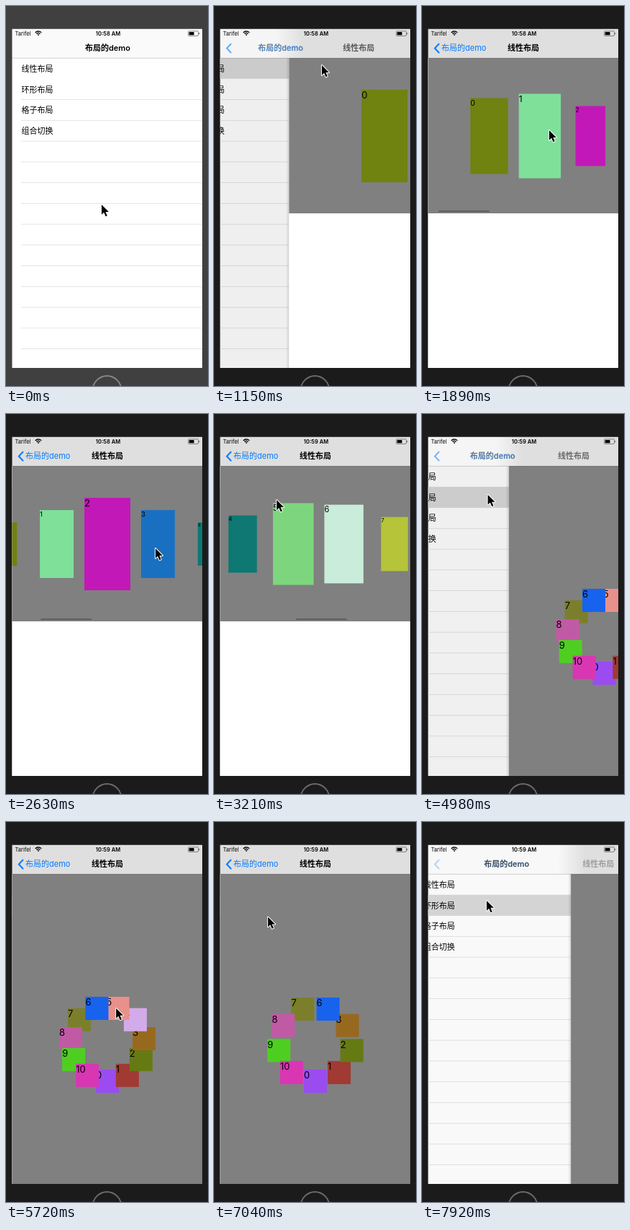
An HTML page with a canvas that plays this animation: 281x526 px, repeating every 8 s.

```html
<!DOCTYPE html>
<html lang="zh">
<head>
<meta charset="utf-8">
<style>
  html, body { margin: 0; width: 100%; height: 100%; overflow: hidden; background: #1b1b1b; }
  canvas { display: block; width: 281px; height: 526px; }
</style>
</head>
<body>
<canvas></canvas>
<script>
const LOOP = 8000, STEP = 147.2;
const LEFT = 8, RIGHT = 273, TOP = 32, BAR = 72, BOTTOM = 501, WIDTH = RIGHT - LEFT, MID = 141;
const FONT = 'Inter, "Noto Sans CJK SC", "Noto Sans CJK", sans-serif';
const ROWS = ['线性布局', '环形布局', '格子布局', '组合切换'];
const HOME_TITLE = '布局的demo', PAGE_TITLE = '线性布局';
const CARD_COLORS = ['#708210', '#7ee099', '#c218b8', '#1a70c0', '#0e7872', '#7dd67d',
  '#c9edda', '#b5c438', '#a05ac8', '#d07848', '#5088d0'];
const RING_COLORS = ['#9a4cf0', '#a03a33', '#667a14', '#97691f', '#d3abea', '#e8918a',
  '#1763ee', '#7b7f2b', '#c05aa5', '#4fce22', '#d936b4'];
const RING_ORDER = [0, 1, 2, 3, 4, 5, 7, 6, 8, 9, 10];

// Navigation: start time, opening or closing, which page
const NAVIGATION = [
  { at: 1030, open: true, page: 0 }, { at: 3917, open: false, page: 0 },
  { at: 4870, open: true, page: 1 }, { at: 7772, open: false, page: 1 },
];
const SELECTIONS = [{ row: 0, from: 900, until: 4217 }, { row: 1, from: 4740, until: 8100 }];
const REMOVALS = [{ at: 6120, id: 5 }, { at: 6650, id: 4 }];

// Keyframes: time followed by values
const CURSOR = [
  [0, 133, 275], [140, 134, 270], [720, 150, 90], [860, 150, 82], [1450, 150, 82],
  [1740, 228, 172], [2040, 122, 172], [2330, 205, 186], [2630, 208, 186], [2770, 205, 180],
  [3210, 87, 119], [3500, 60, 88], [3780, 24, 58], [3940, 24, 58], [4090, 43, 58],
  [4380, 90, 111], [5130, 92, 112], [5720, 154, 260], [6020, 157, 262], [6800, 157, 262],
  [7190, 22, 47], [7330, 23, 57], [7780, 23, 57], [7920, 90, 109],
];
const SCROLL = [[1740, 0], [2040, 1.4], [2200, 1.85], [2400, 2], [2630, 2], [2770, 2.5],
  [3210, 5.44], [3350, 6.2], [3500, 6.65], [3640, 6.8]];

const canvas = document.querySelector('canvas');
const ctx = canvas.getContext('2d');
const ratio = window.devicePixelRatio || 1;
canvas.width = 281 * ratio;
canvas.height = 526 * ratio;

const clamp = x => Math.max(0, Math.min(1, x));
const mix = (a, b, u) => a + (b - a) * u;
const smooth = u => u * u * (3 - 2 * u);
const spring = ms => {
  const x = Math.max(0, ms) * 0.01826;
  return 1 - (1 + x) * Math.exp(-x);
};

function track(frames, t) {
  const i = frames.findIndex(f => f[0] > t);
  if (i < 0) return frames.at(-1).slice(1);
  if (i === 0) return frames[0].slice(1);
  const a = frames[i - 1], b = frames[i], u = (t - a[0]) / (b[0] - a[0]);
  return a.slice(1).map((v, k) => mix(v, b[k + 1], u));
}

function rect(x, y, w, h, color) {
  ctx.fillStyle = color;
  ctx.fillRect(x, y, w, h);
}

function text(str, x, y, size, { weight = 400, color = '#000', alpha = 1, align = 'left' } = {}) {
  ctx.save();
  ctx.globalAlpha *= alpha;
  ctx.font = `${weight} ${size}px ${FONT}`;
  ctx.textAlign = align;
  ctx.fillStyle = color;
  ctx.fillText(str, x, y);
  ctx.restore();
}

function clipped(x, y, w, h, draw) {
  ctx.save();
  ctx.beginPath();
  ctx.rect(x, y, w, h);
  ctx.clip();
  draw();
  ctx.restore();
}

function navState(t) {
  const move = NAVIGATION.findLast(n => n.at <= t);
  if (!move) return { page: 0, shown: 0, bar: 0 };
  const u = spring(t - move.at), lag = u ** 1.18;
  return { page: move.page, shown: move.open ? u : 1 - u, bar: move.open ? lag : 1 - lag };
}

function drawList(t, shown) {
  const rowHeight = 28.75;
  rect(LEFT, BAR, WIDTH, BOTTOM - BAR, '#fff');
  ctx.save();
  ctx.translate(-0.3 * WIDTH * shown, 0);
  for (let i = 2; i < 15; i++) rect(21, BAR + rowHeight * i - 0.3, 400, 0.8, '#dedee1');
  for (const s of SELECTIONS) {
    if (t < s.from) continue;
    ctx.globalAlpha = 1 - clamp((t - s.until) / 300);
    rect(LEFT, BAR + rowHeight * s.row, 400, rowHeight, '#d9d9d9');
    ctx.globalAlpha = 1;
  }
  ROWS.forEach((name, i) => text(name, 21.5, 90.8 + rowHeight * i, 11));
  ctx.restore();
  rect(LEFT, BAR, WIDTH, BOTTOM - BAR, `rgba(0,0,0,${0.1 * shown})`);
}

function drawTile(x, y, w, h, color, label, scale) {
  rect(x - w / 2 * scale, y - h / 2 * scale, w * scale, h * scale, color);
  text(label, x - w / 2 * scale, y - h / 2 * scale + 12.3 * scale, 13 * scale);
}

function drawCards(t) {
  const [scroll] = track(SCROLL, t);
  rect(LEFT, BAR, WIDTH, 215, '#808080');
  CARD_COLORS.forEach((color, i) => {
    const offset = 70.4 * (i - scroll), scale = 1 - Math.abs(offset) / WIDTH;
    if (scale > 0.35) drawTile(MID + offset, 180, 64, 128, color, i, scale);
  });
  if (t > 1740 && t < 3800) {
    ctx.fillStyle = '#5a5a5a';
    ctx.beginPath();
    ctx.roundRect(10 + 19.1 * scroll, 283.3, 71, 1.8, 0.9);
    ctx.fill();
  }
}

function drawRing(t) {
  rect(LEFT, BAR, WIDTH, BOTTOM - BAR, '#808080');
  for (const id of RING_ORDER) {
    let slot = id, count = RING_COLORS.length, alpha = 1;
    let angle = slot / count;
    for (const r of REMOVALS) {
      const u = smooth(clamp((t - r.at) / 300));
      count--;
      if (id === r.id) { alpha = 1 - u; break; }
      if (id > r.id) slot--;
      angle = mix(angle, slot / count, u);
    }
    ctx.globalAlpha = alpha;
    drawTile(MID + 51.5 * Math.sin(angle * 2 * Math.PI), 307.4 + 51.5 * Math.cos(angle * 2 * Math.PI),
      32, 32, RING_COLORS[id], id, 1);
    ctx.globalAlpha = 1;
  }
}

function drawPage(t, { page, shown }) {
  const shift = WIDTH * (1 - shown), edge = LEFT + shift;
  const shadow = ctx.createLinearGradient(edge - 4, 0, edge, 0);
  shadow.addColorStop(0, 'rgba(0,0,0,0)');
  shadow.addColorStop(1, `rgba(0,0,0,${0.13 * Math.min(1, shown * 4)})`);
  rect(edge - 4, BAR, 4, BOTTOM - BAR, shadow);
  clipped(edge, BAR, WIDTH, BOTTOM - BAR, () => {
    ctx.translate(shift, 0);
    rect(LEFT, BAR, WIDTH, BOTTOM - BAR, '#fff');
    (page === 0 ? drawCards : drawRing)(t);
  });
}

function drawBar({ shown, bar }) {
  const edge = LEFT + WIDTH * (1 - shown), light = Math.round(250 - 8 * shown);
  const listTone = `rgb(${light},${light},${light})`, pageTone = '#dfdfdf';
  let fill = shown > 0.5 ? pageTone : listTone;
  if (shown > 0.01 && shown < 0.99) {
    fill = ctx.createLinearGradient(edge - 18, 0, edge + 20, 0);
    fill.addColorStop(0, listTone);
    fill.addColorStop(1, pageTone);
  }
  rect(LEFT, TOP - 0.5, WIDTH, BAR - TOP + 0.5, fill);
  rect(LEFT, BAR - 0.2, WIDTH, 0.7, 'rgba(0,0,0,.25)');

  const x = 110 - 83 * bar;
  text(HOME_TITLE, x, 62.2, 11, { weight: 600, alpha: 1 - bar });
  text(HOME_TITLE, x, 62.2, 11, { color: '#007aff', alpha: bar });
  text(PAGE_TITLE, 119 + 146 * (1 - bar), 62.2, 11, { weight: 600, alpha: bar });

  ctx.save();
  ctx.globalAlpha = bar;
  ctx.strokeStyle = '#007aff';
  ctx.lineWidth = 2;
  ctx.beginPath();
  ctx.moveTo(24, 52);
  ctx.lineTo(17.8, 58.5);
  ctx.lineTo(24, 65);
  ctx.stroke();
  ctx.restore();
}

function drawStatus(t) {
  text('Tarifel', 12.5, 41, 7.5);
  text(t < 2900 ? '10:58 AM' : '10:59 AM', 142, 41, 7.6, { weight: 600, align: 'center' });
  ctx.strokeStyle = ctx.fillStyle = '#000';
  ctx.lineWidth = 1.3;
  for (const r of [3.6, 6]) {
    ctx.beginPath();
    ctx.arc(45, 41, r, -Math.PI * 0.76, -Math.PI * 0.24);
    ctx.stroke();
  }
  ctx.beginPath();
  ctx.moveTo(45, 41);
  ctx.arc(45, 41, 2, -Math.PI * 0.76, -Math.PI * 0.24);
  ctx.fill();
  ctx.lineWidth = 0.7;
  ctx.strokeStyle = '#555';
  ctx.beginPath();
  ctx.roundRect(253.5, 34.8, 14, 6.6, 1.4);
  ctx.stroke();
  rect(254.7, 36, 6.8, 4.2, '#000');
  rect(268.4, 37, 0.9, 2.2, '#555');
}

function drawCursor(t) {
  const [x, y] = track(CURSOR, t);
  ctx.save();
  ctx.translate(x, y);
  ctx.lineJoin = 'round';
  ctx.lineWidth = 2;
  ctx.strokeStyle = '#fff';
  ctx.fillStyle = '#000';
  const arrow = new Path2D('M0 0V13.8L3.2 10.8L5.6 16.2L7.8 15.3L5.5 9.9H10Z');
  ctx.stroke(arrow);
  ctx.fill(arrow);
  ctx.restore();
}

function draw(t) {
  const nav = navState(t), active = t > 500;
  ctx.setTransform(ratio, 0, 0, ratio, 0, 0);
  rect(0, 0, 281, 526, active ? '#1b1b1b' : '#404040');
  ctx.strokeStyle = active ? '#6a6a6a' : '#858585';
  ctx.lineWidth = 2;
  ctx.beginPath();
  ctx.arc(140.5, 532, 20, 0, 2 * Math.PI);
  ctx.stroke();
  clipped(LEFT + 0.5, TOP - 0.5, WIDTH - 0.5, BOTTOM - TOP + 0.5, () => {
    drawList(t, nav.shown);
    if (nav.shown > 0.002) drawPage(t, nav);
    drawBar(nav);
    drawStatus(t);
  });
  drawCursor(t);
}

function tick() {
  const step = Math.floor((performance.now() % LOOP + 33) / STEP);
  draw(Math.max(0, step * STEP - 29));
  requestAnimationFrame(tick);
}
tick();
</script>
</body>
</html>
```
